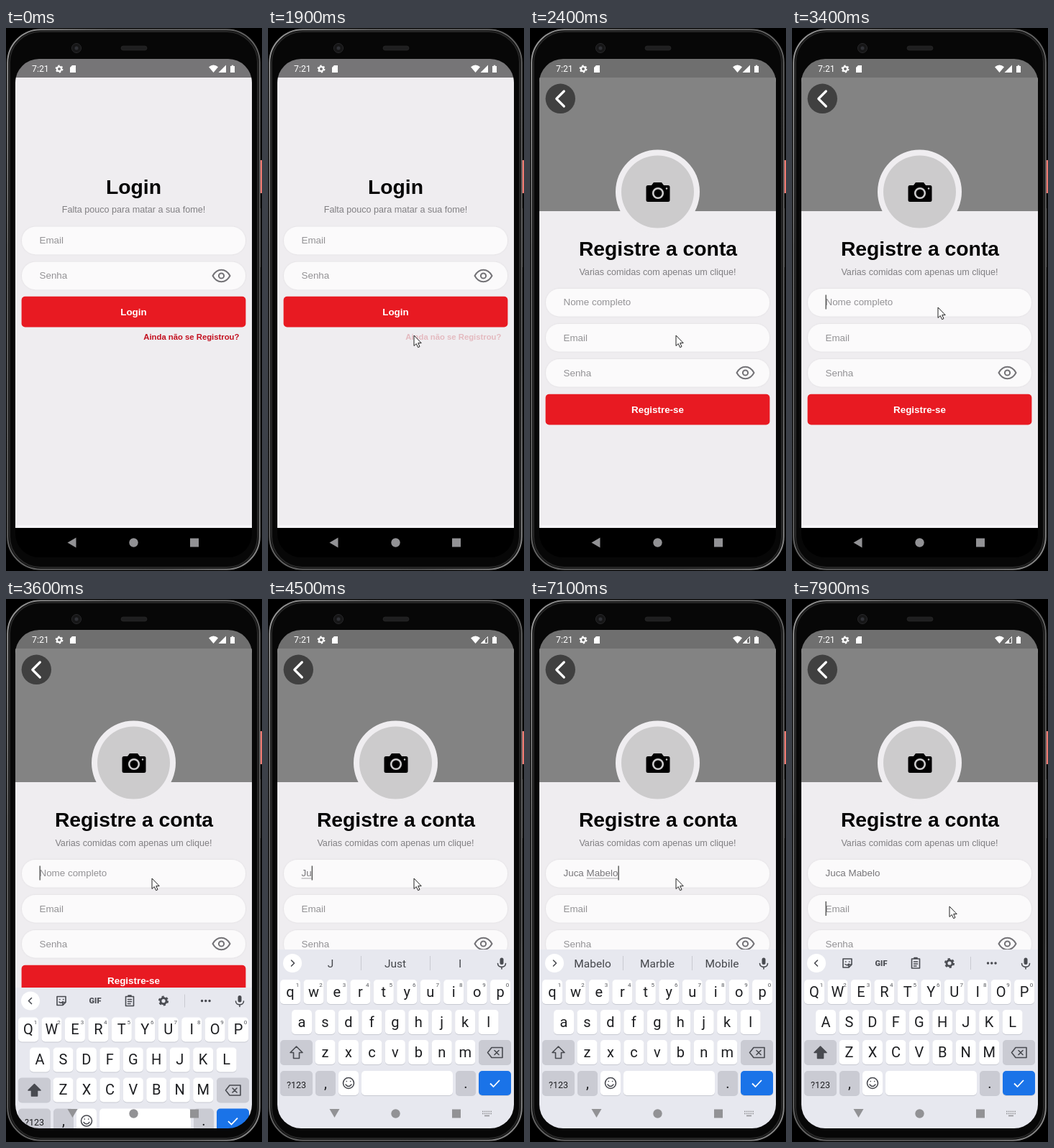
These frames come from a looping animation (356x756 px, 8 s). An HTML page:

```html
<!DOCTYPE html>
<html lang="pt-BR">
<head>
<meta charset="utf-8">
<title>Registro</title>
<style>
html, body { margin: 0; width: 100%; height: 100%; overflow: hidden; background: #000; }
svg { display: block; width: 356px; height: 756px; }
text { font-family: "Liberation Sans", Arial, sans-serif; white-space: pre; }
.mid { text-anchor: middle; }
.title { font-size: 28.3px; font-weight: 700; fill: #050505; }
.sub { font-size: 12.6px; fill: #807f82; }
.input { font-size: 13.4px; fill: #939295; }
.typed { fill: #78777a; }
.button { font-size: 13.4px; font-weight: 700; fill: #fff; }
.roboto { font-family: Roboto, sans-serif; }
.key { font-size: 20px; fill: #1d1e21; }
.hint { font-size: 8px; fill: #55575c; }
.word { font-size: 15.5px; fill: #45474c; }
.line { fill: none; stroke: #484a50; stroke-width: 1.6; stroke-linecap: round; stroke-linejoin: round; }

#link, #login, #register, #status, #cursor, #keys, .dark, .light, #dock, .full, .weak {
  animation: 8s linear infinite;
}
#link { font-size: 11.3px; font-weight: 700; fill: #c3101f; animation-name: press; }
#login { transform-origin: 177.5px 382px; animation-name: zoom-out; }
#register { transform-origin: 177.5px 382px; animation-name: zoom-in; }
#status { animation-name: tint; }
#cursor { animation-name: move; }
#keys { animation-name: rise; }
.dark { animation-name: until-keys; }
.light { animation-name: after-keys; }
.full { animation-name: until-settled; }
.weak, #dock { animation-name: after-settled; }

@keyframes press { 0%, 23.7% { opacity: 1 } 23.75%, 24.8% { opacity: .23 } 25.6%, 100% { opacity: 1 } }
@keyframes zoom-out {
  0%, 25.6% { transform: scale(1); animation-timing-function: cubic-bezier(.1, .7, .2, 1) }
  27.4%, 100% { transform: scale(1.15) }
}
@keyframes zoom-in {
  0%, 25.6% { opacity: 0; transform: scale(.85); animation-timing-function: cubic-bezier(.1, .7, .2, 1) }
  26% { opacity: 0; transform: scale(.94) }
  27.4% { opacity: .58; transform: scale(1) }
  27.5% { opacity: .62; transform: scale(1) }
  28.7%, 100% { opacity: 1; transform: scale(1) }
}
@keyframes tint { 0%, 26% { fill: #767577 } 28.7%, 100% { fill: #6f6f6f } }
@keyframes move {
  0%, 4.99% { transform: translate(21px, 481px); opacity: 0 }
  5% { transform: translate(21px, 481px); opacity: 1; animation-timing-function: ease-out }
  15%, 36.2% { transform: translate(203px, 428px); opacity: 1; animation-timing-function: ease-in-out }
  41.2%, 88.7% { transform: translate(203px, 389px); opacity: 1; animation-timing-function: ease-in-out }
  95%, 100% { transform: translate(219px, 428px); opacity: 1 }
}
@keyframes rise {
  0%, 43.2% { transform: translateY(249px); animation-timing-function: ease-out }
  46.2%, 100% { transform: none }
}
@keyframes until-keys { 0%, 43.74% { opacity: 1 } 43.75%, 100% { opacity: 0 } }
@keyframes after-keys { 0%, 43.74% { opacity: 0 } 43.75%, 100% { opacity: 1 } }
@keyframes until-settled { 0%, 47.4% { opacity: 1 } 47.5%, 100% { opacity: 0 } }
@keyframes after-settled { 0%, 47.4% { opacity: 0 } 47.5%, 100% { opacity: 1 } }
</style>
</head>
<body>
<svg viewBox="0 0 356 756">
  <defs>
    <clipPath id="screen"><rect x="13" y="43" width="329" height="694" rx="33"/></clipPath>
    <clipPath id="view"><rect x="13" y="69" width="329" height="627"/></clipPath>
    <linearGradient id="rim" x2="1" y2="1">
      <stop offset="0" stop-color="#999"/><stop offset=".2" stop-color="#666"/>
      <stop offset=".8" stop-color="#5c5c5c"/><stop offset="1" stop-color="#8a8a8a"/>
    </linearGradient>
    <filter id="soft" x="-5%" y="-25%" width="110%" height="150%">
      <feDropShadow dx="0" dy="0" stdDeviation="1.3" flood-opacity=".09"/>
    </filter>
    <rect id="field" x="22" width="311" height="38.5" rx="19.2" fill="#fbfafb" filter="url(#soft)"/>
    <rect id="bar" x="21.6" width="311.8" height="42.6" rx="5" fill="#e81a22"/>
    <g id="eye" fill="none" stroke="#737276" stroke-width="2">
      <path d="M-12 0C-6-11 6-11 12 0C6 11-6 11-12 0Z" stroke-linejoin="round"/>
      <circle r="3.6"/>
    </g>
    <g id="gear" fill="none" stroke="currentColor">
      <circle r="3.1" stroke-width="2.2"/><circle r="4.6" stroke-width="1.7" stroke-dasharray="2.4 2.417"/>
    </g>
  </defs>

  <rect width="356" height="756"/>
  <rect x="353" y="184" width="3" height="46" fill="#ee7a72"/>
  <rect x="353" y="251" width="2" height="82" fill="#1c1c1c"/>
  <rect x="2.2" y="2.2" width="350.6" height="751.6" rx="46" fill="#050505" stroke="url(#rim)" stroke-width="2"/>
  <rect x="5" y="5" width="345" height="746" rx="43" fill="#070707" stroke="#262626" stroke-width="2"/>
  <circle cx="98" cy="28" r="6.5" fill="#161617" stroke="#29292b"/><circle cx="98" cy="28" r="2.5" fill="#303136"/>
  <rect x="160" y="25" width="36" height="6" rx="3" fill="#1f1f20" stroke="#2b2b2b" stroke-width=".6"/>

  <g clip-path="url(#screen)">
    <rect x="13" y="43" width="329" height="694"/>
    <g clip-path="url(#view)">
      <g id="login">
        <rect x="13" y="69" width="329" height="627" fill="#efedf0"/>
        <text class="title mid" x="177.5" y="231">Login</text>
        <text class="sub mid" x="177.5" y="257.2">Falta pouco para matar a sua fome!</text>
        <use href="#field" y="276.7"/><text class="input" x="46.5" y="300">Email</text>
        <use href="#field" y="325.7"/><text class="input" x="46.5" y="349.3">Senha</text>
        <use href="#eye" x="299.5" y="345"/>
        <use href="#bar" y="373.8"/><text class="button mid" x="177.5" y="400">Login</text>
        <text id="link" x="191.3" y="434.3">Ainda não se Registrou?</text>
      </g>
      <g id="register">
        <rect x="13" y="69" width="329" height="627" fill="#efedf0"/>
        <rect x="13" y="69" width="329" height="186" fill="#838383"/>
        <circle cx="177.5" cy="228" r="58.5" fill="#efedf0"/>
        <circle cx="177.5" cy="228" r="50.5" fill="#cccbcc"/>
        <path d="M164 219H169L172 215H183L186 219H192Q194.5 219 194.5 221.5V240Q194.5 242 192 242H164Q161.5 242 161.5 240V221.5Q161.5 219 164 219Z"/>
        <circle cx="178" cy="230" r="6.8" fill="none" stroke="#cccbcc" stroke-width="2.6"/>
        <circle cx="190" cy="223.5" r="1.2" fill="#cccbcc"/>
        <circle cx="42.3" cy="98.3" r="20.7" fill="#404040"/>
        <path d="M47.3 88L36.8 98.5L47.3 109" fill="none" stroke="#fff" stroke-width="3.2" stroke-linecap="round" stroke-linejoin="round"/>
        <text class="title mid" x="178" y="317.4">Registre a conta</text>
        <text class="sub mid" x="177.5" y="343.7">Varias comidas com apenas um clique!</text>
        <use href="#field" y="363"/><text class="input" id="name" x="46.5" y="386.3"></text>
        <use href="#field" y="412"/><text class="input" x="46.5" y="435.7">Email</text>
        <use href="#field" y="461"/><text class="input" x="46.5" y="484.6">Senha</text>
        <use href="#eye" x="299.5" y="480"/>
        <rect id="underline" y="388.5" height=".9" fill="#9a999c"/>
        <rect id="caret" width="1.4" height="20" fill="#555"/>
        <use href="#bar" y="509.8"/><text class="button mid" x="177.5" y="535.8">Registre-se</text>
      </g>
      <rect x="13" y="692" width="329" height="4" fill="#f6f5f8"/>
    </g>

    <rect id="status" x="13" y="43" width="329" height="26"/>
    <g fill="#fff" color="#fff">
      <text class="roboto" x="36" y="61.3" font-size="12.3">7:21</text>
      <use href="#gear" x="74" y="57"/>
      <path d="M92 52H97V62H89V55Z"/>
      <path d="M282 54.2Q288.5 49 295 54.2L288.5 62Z"/>
      <path class="full" d="M306 51.5V62H295.5Z"/>
      <g class="weak"><path d="M305.5 52.5V61.5H296.5Z" fill="none" stroke="#fff"/><path d="M302 56V62H296Z"/></g>
      <path d="M312 53H313.8V51.8H316.2V53H318V62H312Z"/>
    </g>

    <g id="keys">
      <rect x="13" y="488" width="329" height="249" fill="#e7e8ef"/>
      <circle cx="34" cy="507" r="13" fill="#fff"/>
      <path id="chevron" class="line"/>
      <g class="line">
        <rect x="322.5" y="499.5" width="5" height="9.5" rx="2.5" fill="#484a50" stroke="none"/>
        <path d="M319.5 507.5C319.5 514 330.5 514 330.5 507.5M325 512.5V515"/>
      </g>
      <g id="tools" color="#4b4d53">
        <g class="line">
          <path d="M71 501H83V509L79 513H71ZM83 509H79V513M74.5 505H75M79.5 505H80M74 508.5Q77 511 79 508"/>
          <path d="M166.5 501H177.5V514H166.5ZM170 501V499.5H174V501M169.5 505H174.5M169.5 508H174.5M169.5 511H173"/>
        </g>
        <text class="roboto mid" x="124" y="510.5" font-size="11" font-weight="900" fill="#4b4d53">GIF</text>
        <use href="#gear" transform="translate(219 507) scale(1.3)"/>
        <path d="M248.5 498V516" stroke="#c9cad1"/>
        <path d="M272.5 507H272.6M277.7 507H277.8M283 507H283.1" stroke="#484a50" stroke-width="3.4" stroke-linecap="round"/>
      </g>
      <g id="words">
        <path d="M129.5 497V517M225.5 497V517" stroke="#c9cad1"/>
      </g>
      <g id="board"></g>
      <path id="shift" class="line" d="M39.5 623L48 631.5H43.5V639.5H35.5V631.5H31Z"/>
      <path class="line" d="M305.5 631.5L311 624.5H326V638.5H311ZM315 628.5L321 634.5M321 628.5L315 634.5"/>
      <g class="line"><circle cx="112" cy="674" r="7.5"/><path d="M108 676Q112 681 116 676M109.3 671.5V671.6M114.7 671.5V671.6"/></g>
      <path d="M309 674.5L313.5 679L322 670" fill="none" stroke="#fff" stroke-width="1.8"/>
    </g>

    <g fill="#929295">
      <path class="dark" d="M97.5 709.5V723.5L85.5 716.5Z"/>
      <path class="light" d="M85.5 710H99.5L92.5 722Z"/>
      <circle cx="177.5" cy="716.5" r="6.2"/>
      <rect x="256" y="710.5" width="12" height="12"/>
      <g id="dock" fill="none" stroke="#929295" stroke-width="1.5">
        <path d="M298 713.5H311M298 716.5H311" stroke-dasharray="1.6 1.25"/><path d="M301 719.5H308"/>
      </g>
    </g>
  </g>

  <path id="cursor" d="M0 0V14.5L3.3 11.5L5.6 16.7L8 15.6L5.7 10.6H10.2Z" fill="#fff" stroke="#222" stroke-linejoin="round"/>
</svg>

<script>
const $ = id => document.getElementById(id);
const NS = 'http://www.w3.org/2000/svg';
const LEFT = 46.5;

function add(parent, tag, attrs, content = '') {
  const el = document.createElementNS(NS, tag);
  for (const k in attrs) el.setAttribute(k, attrs[k]);
  el.textContent = content;
  return parent.appendChild(el);
}

function key(x, y, width, fill, label = '', cls = 'key') {
  add($('board'), 'rect', { x, y: y + 1, width, height: 34, rx: 5, fill: '#c8cad2' });
  add($('board'), 'rect', { x, y, width, height: 34, rx: 5, fill });
  return add($('board'), 'text', { class: `roboto mid ${cls}`, x: x + width / 2, y: y + 23.5 }, label);
}

// Keyboard
const letters = [];
[['qwertyuiop', 17, 530], ['asdfghjkl', 33, 572], ['zxcvbnm', 65.5, 614]].forEach(([row, x0, y], r) => {
  [...row].forEach((c, i) => {
    const x = x0 + i * 32.45;
    letters.push(key(x, y, 28, '#fff', c));
    if (r === 0) add($('board'), 'text', { class: 'roboto mid hint', x: x + 24, y: y + 9.5 }, (i + 1) % 10);
  });
});
const GREY = '#cacbd3';
key(17, 614, 45, GREY);
key(293, 614, 45, GREY);
key(17, 657, 45, GREY, '?123').style.fontSize = '12.5px';
key(66, 657, 28, GREY, ',');
key(98, 657, 28, '#fff');
key(130, 657, 127, '#fff');
key(261, 657, 28, GREY, '.');
key(293, 657, 45, '#1a73e8');

const words = [87, 177, 267].map(x => add($('words'), 'text', { class: 'roboto mid word', x, y: 512.5 }));

// [start ms, typed name, suggestions (none shows the tool row), capitals]
const steps = [
  [0, '', '', true],
  [4300, 'J', '', false],
  [4400, 'Ju', 'J Just I', false],
  [4700, 'Juc', 'J Just I', false],
  [4800, 'Juca', 'J Just I', false],
  [5000, 'Juca ', 'I The And', true],
  [5200, 'Juca M', 'M My May', false],
  [5600, 'Juca Ma', 'M My May', false],
  [5700, 'Juca Mab', 'Ma Maybe Make', false],
  [5800, 'Juca Mabe', 'Ma Maybe Make', false],
  [6000, 'Juca Mabel', 'Mab Maybe Make', false],
  [6200, 'Juca Mabelo', 'Mab Maybe Make', false],
  [6400, 'Juca Mabelo', 'Mabelo Marble Mobile', false],
  [7800, 'Juca Mabelo', '', true],
];

let shown = null;
let caretX = LEFT;

function apply(step) {
  const [start, typed, hints, caps] = step;
  const name = $('name');
  name.textContent = typed || 'Nome completo';
  name.classList.toggle('typed', !!typed);

  const wordAt = typed.lastIndexOf(' ') + 1;
  const width = typed ? name.getComputedTextLength() : 0;
  const before = wordAt ? name.getSubStringLength(0, wordAt) : 0;
  caretX = LEFT + width;
  $('underline').setAttribute('x', LEFT + before);
  $('underline').setAttribute('width', start < 7800 ? Math.max(0, width - before) : 0);

  letters.forEach(el => {
    el.textContent = caps ? el.textContent.toUpperCase() : el.textContent.toLowerCase();
  });
  $('shift').style.fill = caps ? '#484a50' : 'none';
  $('tools').style.display = hints ? 'none' : '';
  $('words').style.display = hints ? '' : 'none';
  hints.split(' ').forEach((w, i) => { words[i].textContent = w; });
  $('chevron').setAttribute('d', hints ? 'M32.5 503L36.5 507L32.5 511' : 'M35.5 503L31.5 507L35.5 511');
}

function render(t) {
  const step = steps.findLast(s => s[0] <= t);
  if (step !== shown) apply(shown = step);
  const onEmail = t >= 7800;
  const visible = t >= 3300 && !(t >= 3900 && t < 4300) && !(t >= 7100 && t < 7600);
  $('caret').style.display = visible ? '' : 'none';
  $('caret').setAttribute('x', onEmail ? LEFT : caretX);
  $('caret').setAttribute('y', onEmail ? 421 : 371.5);
}

// Typing follows the clock of the CSS motion
const clock = $('cursor').getAnimations()[0];
function tick() {
  render(((clock ? clock.currentTime : performance.now()) || 0) % 8000);
  requestAnimationFrame(tick);
}
tick();
</script>
</body>
</html>
```
